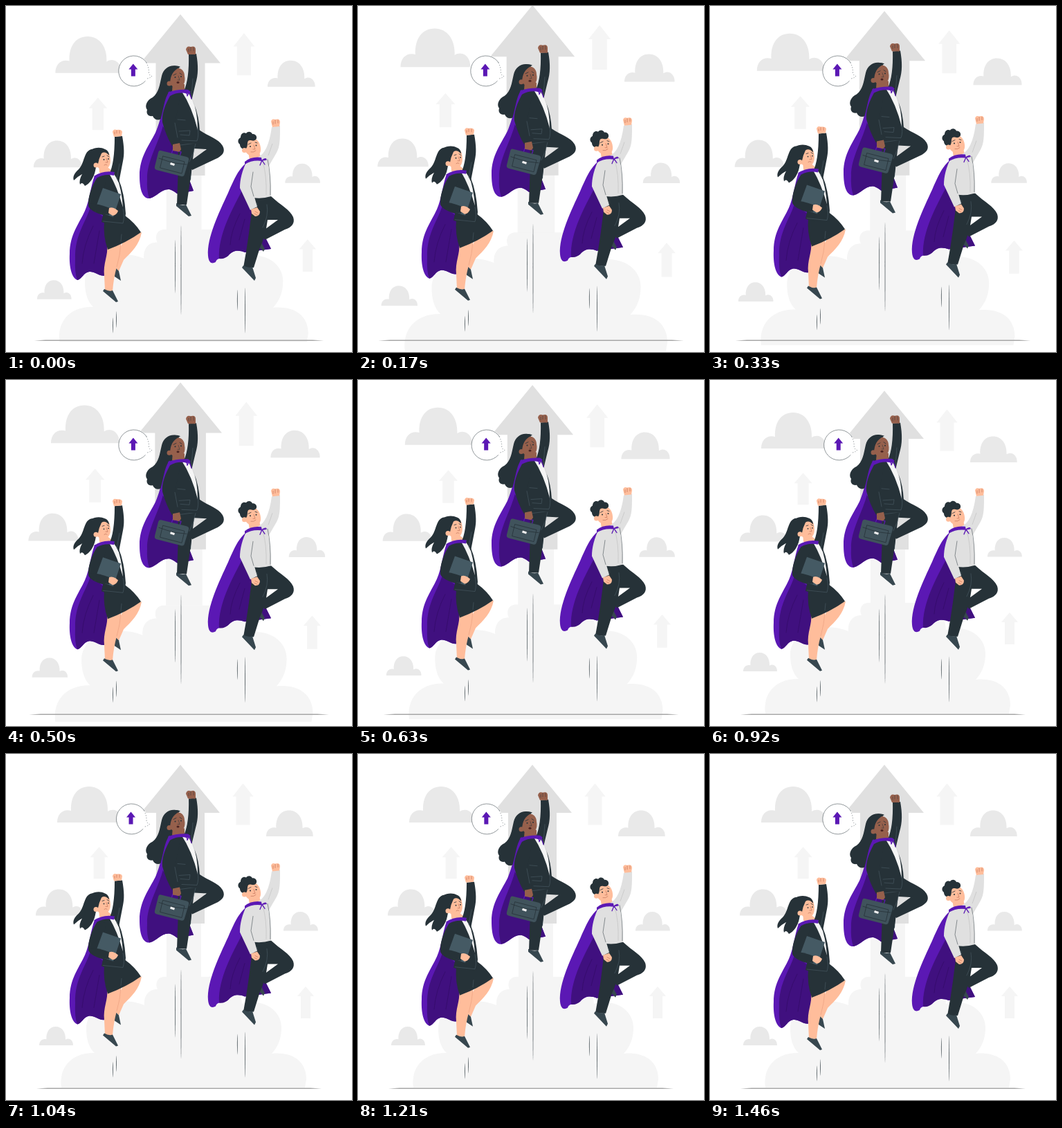
Write an HTML page that moves like this. It is 500 px wide and 500 px high and loops after 1.5 s.

```html
<!DOCTYPE html>
<html lang="en">
<head>
<meta charset="utf-8">
<title>Heroes taking off</title>
<style>
  html, body { margin: 0; width: 100%; height: 100%; overflow: hidden; background: #fff; }
  svg { display: block; width: 100vw; height: 100vh; }
  .dark { fill: #263238; }
  .grey { fill: #37474f; }
  .slate { fill: #455a64; }
  .cape { fill: #5b18b4; }
  .lining { fill: #40107f; }
  .shirt { fill: #e0e0e0; }
  .white { fill: #f5f5f5; }
  .skin { fill: #ffbd9b; }
  .brown { fill: #96604c; }
  .haze { fill: #f5f5f5; }
  .cloud { fill: #e9e9e9; }
  .seam, .ink, .thin, .bow, .knuckle, .fold { fill: none; stroke-linecap: round; stroke-linejoin: round; }
  .seam { stroke: #53656e; stroke-width: .5; }
  .ink { stroke: #263238; stroke-width: .8; }
  .thin { stroke: #263238; stroke-width: .5; }
  .bow { stroke: #5b18b4; stroke-width: 1.3; }
  .knuckle { stroke: #b5654d; stroke-width: .6; }
  .fold { stroke: #340c69; stroke-width: .8; }
</style>
</head>
<body>
<svg viewBox="0 0 500 500">
  <g id="sky">
    <path class="haze" d="M232 240H282V350H232Z"/>
    <path fill="#e0e0e0" d="M252 15.500L309 85H287V245H217V85H195Z"/>
    <g id="clouds" class="cloud"></g>
    <g id="arrows" class="haze"></g>
    <path class="haze" d="M80 482C76 452 96 431 128 432C119 424 116 410 116 397C116 372 140 357 168 357Q186 357 200 363C199 348 207 340 219 340C215 331 219 322 229 322H295C325 321 340 335 341 361Q352 357 362 359C385 362 398 378 398 395C398 410 394 422 384 433C415 430 434 445 434 470L432 482Z"/>
  </g>
  <path id="floor" fill="#a6a6a6" d="M44 483.4L60 482.4H440L456 483.4L440 483.9H60Z"/>

  <g id="bubble">
    <path fill="#fff" d="M206 86A22 22 0 1 0 203 106Q208 105 211 102Q207 101 206.500 97Z"/>
    <path class="thin" d="M203.400 82A22 22 0 1 0 201.400 108.500"/>
    <path class="thin" stroke-dasharray=".6 3" d="M203 82Q207 89 206.500 97Q208 101 211 101.500Q207 105 203 105"/>
    <path class="cape" d="M184 83.500L190.500 91.500H187V101.500H181V91.500H177.500Z"/>
  </g>

  <g id="heroes">
    <g id="streaks" class="dark"></g>

    <!-- left -->
    <g>
      <path class="cape" d="M128 245C122 262 121 280 114 296C106 314 92 330 92 358C91 377 95 393 103 396C110 395 112 384 122 384C132 385 136 392 145 389L160 330L152 250Z"/>
      <path class="lining" d="M122 290C117 310 99 330 100 365Q99 386 103 396C110 395 112 384 122 384C132 385 136 392 145 389L160 320Z"/>
      <path class="fold" d="M126 318Q112 345 110 372M135 325L127 372"/>
      <path class="dark" d="M124 207C112 209 114 227 105 236C99 241 96 247 98 252Q104 246 110 243Q105 252 107 258Q110 253 114 260C121 257 127 248 129 238L134 212Z"/>
      <path class="skin" d="M183 330L196 327C193 345 181 356 170 367L163 383L157 377C160 358 168 342 172 336Z"/>
      <path class="grey" d="M157 377L163 383L166 397L157 391Z"/>
      <path class="skin" d="M146 346C148 360 140 372 142 390L143 411L154 412C155 399 157 388 160 377C163 366 166 357 166 343Z"/>
      <path fill="none" stroke="#e89d7c" stroke-width=".6" d="M166 343Q165 360 160 377"/>
      <path class="grey" d="M142 409Q149 413 154 411L162 427L159 428L140 412Z"/>
      <path class="dark" d="M142 311L172 303Q186 313 195 327Q174 342 147 352Q140 332 142 311Z"/>
      <path class="seam" d="M167 330L166 340"/>
      <path class="skin" d="M134 229L135 241L151 246L154 239L147 233Z"/>
      <path class="dark" d="M157 189L168 188C171 205 171 215 169 224L163 255L149 243Q157 228 157 189Z"/>
      <path class="white" d="M145 242L154 241Q166 252 171 294L160 285Z"/>
      <path class="dark" d="M133 246L149 242Q161 262 169 291Q167 264 160 247L163 251Q171 270 173 300L171 316Q153 318 138 312L141 298Z"/>
      <path class="dark" d="M133 246C123 260 118 278 119 289Q122 297 140 302L149 303L151 292L137 284L145 250Z"/>
      <path class="seam" d="M140 311L169 314Q172 305 169 293M164 228L160 250M137 284L151 291"/>
      <path class="slate" d="M140 263L166 272L155 305L128 296Z"/>
      <path class="dark" d="M119 286Q128 284 150 292L149 302Q122 298 119 286Z"/>
      <path class="skin" d="M149 292Q153 290 158 293L162 296Q160 302 154 303L148 299Z"/>
      <path class="cape" d="M127 246Q140 237 157 240L156 245Q143 242 132 248Z"/>
      <path class="skin" d="M132 212C139 205 148 207 150 216C152 225 151 234 143 236C137 237 132 234 130 229Z"/>
      <path class="dark" d="M131 231C121 236 113 226 115 216C119 206 134 202 143 207C148 209 149 213 149 216Q143 209 138 213Q134 221 133 228Z"/>
      <circle class="skin" cx="130" cy="230" r="3.500"/>
      <path class="ink" d="M139 218L142 217M146 216L149 218"/>
      <path class="knuckle" d="M145 220L147 226L144 226M142 230Q145 228 146 230"/>
      <circle class="dark" cx="141.500" cy="222" r=".9"/><circle class="dark" cx="148" cy="221" r=".9"/>
      <path class="skin" d="M156 189L154 182Q155 177 160 179Q167 178 168 182L167 188Z"/>
      <path class="knuckle" d="M157 182V185M160 180V184M164 180V184"/>
    </g>

    <!-- middle -->
    <g>
      <path class="cape" d="M236 123C228 135 226 160 216 183C207 201 193 218 193 245C193 265 197 279 208 278C219 275 224 264 236 265C244 267 247 273 250 271L271 267L262 244L262 135Z"/>
      <path class="lining" d="M227 172C222 195 203 225 204 250Q203 266 207 278C219 275 224 264 236 265C244 267 247 273 250 271L271 267L262 244L255 180Z"/>
      <path class="dark" d="M250 88C239 83 228 89 225 101C222 114 221 125 212 132C203 136 200 145 204 150C202 156 206 160 212 159C215 166 223 166 227 161Q239 136 244 119Z"/>
      <path class="cape" d="M236 123C228 135 228 150 222 168L230 178L245 135Z"/>
      <path class="slate" d="M258 226L268 234L267 252L259 242Z"/>
      <path class="dark" d="M248 194L279 179C294 189 307 192 313 202C318 211 312 217 303 221L269 237L264 226L290 207L272 206Q269 228 268 240L261 287H247L249 230Z"/>
      <path class="seam" d="M274 199L271 211L265 225M252 201L274 198"/>
      <path class="grey" d="M246 285Q253 289 260 287L268 303L264 304L246 289Z"/>
      <path class="brown" d="M241 111L240 123L258 126L258 113Z"/>
      <path class="dark" d="M264 70L275 69C278 86 278 99 274 112L268 137L257 123Q265 105 264 70Z"/>
      <path class="white" d="M248 123L261 122Q274 138 279 180L268 165Z"/>
      <path class="dark" d="M239 125L253 122Q269 146 277 179Q277 152 269 134L272 142Q279 160 280 181L277 199L246 198Z"/>
      <path class="dark" d="M240 125C229 143 225 157 226 168Q231 187 240 202L252 198L244 169L251 135Z"/>
      <path class="seam" d="M244 169L248 190M248 164L259 165M250 181L266 180L265 187L252 186M254 194L276 195Q279 187 277 176M270 105L268 130"/>
      <path class="cape" d="M234 125Q247 120 263 121L267 124L262 127Q250 123 237 130Z"/>
      <path class="bow" d="M261 124L262 130L265 124L268 134"/>
      <path class="brown" d="M236 96C246 85 258 90 258 101C260 111 256 118 247 118C241 118 237 113 235 108Z"/>
      <path class="dark" d="M252 88C243 84 231 88 231 102L233 113L237 111C238 101 240 94 252 88Z"/>
      <circle class="brown" cx="236" cy="112" r="3.500"/>
      <path class="ink" d="M242 100L246 98M251 97L254 99"/>
      <path class="thin" d="M249 101L251 107L248 107"/>
      <ellipse cx="248.500" cy="110.500" rx="2" ry="1.500" fill="#4b2422"/>
      <circle class="dark" cx="244.500" cy="103" r="1"/><circle class="dark" cx="253" cy="102" r="1"/>
      <path class="brown" d="M263 70L260 63Q261 57 267 59Q274 57 274 63L274 70Z"/>
      <path class="thin" d="M264 62V66M267 60V65M271 60V65"/>
      <path class="bow" d="M239 214L241 208L253 211L251 217"/>
      <path class="brown" d="M241 200L251 198L253 207Q251 212 247 210L241 209Z"/>
      <path fill="#40535c" d="M224 209L261 218Q265 219 264 223L258 243Q257 247 253 246L218 237Q214 236 215 232L220 212Q221 208 224 209Z"/>
      <path class="ink" d="M221 220L233 224L244 227L261 229M227 217L258 225L254 242L223 234Z"/>
      <path fill="#f0f0f0" d="M238 226L244 228L243 231L237 229Z"/>
    </g>

    <!-- right -->
    <g>
      <path class="cape" d="M366 219C340 222 331 248 321 270C308 298 290 335 292 361C293 372 298 373 303 370C306 362 313 367 321 361C329 352 337 353 345 356L383 351L370 325L365 225Z"/>
      <path class="lining" d="M343 263C328 292 306 330 308 365C314 366 317 364 321 361C329 352 337 353 345 356L383 351L370 325Z"/>
      <path class="fold" d="M338 300Q325 325 324 345M345 308L337 338"/>
      <path class="grey" d="M366 336L374 351L372 355L364 346Z"/>
      <path class="dark" d="M357 276L383 275C397 288 410 294 415 305C418 314 413 320 403 323L374 338L367 328L393 309L378 309Q375 333 367 349L358 378H343Q352 330 357 276Z"/>
      <path class="seam" d="M377 287Q380 303 371 320M363 285L362 298"/>
      <path class="grey" d="M343 375Q350 379 356 377L361 393L359 397L341 378Z"/>
      <path class="skin" d="M350 210L352 223L369 222L366 211Z"/>
      <path class="shirt" d="M384 175L396 173C396 193 396 203 391 212L377 236L363 219Q379 213 384 175Z"/>
      <path class="shirt" d="M349 222Q362 217 375 221Q383 238 383 275Q370 279 357 277L354 258Z"/>
      <path class="shirt" d="M349 222C341 238 338 251 338 263L353 295L363 290L355 262L360 237Z"/>
      <path class="thin" d="M378 222Q383 243 382 273M357 240L354 261L358 275"/>
      <path fill="none" stroke="#bdbdbd" stroke-width=".6" d="M371 225Q377 245 376 273M385 199L379 216"/>
      <path class="cape" d="M345 225Q355 217 369 219L370 224Q356 222 345 229Z"/>
      <path class="bow" d="M370 223Q376 219 376 222L370 223L367 230M370 223L374 229"/>
      <path class="skin" d="M354 294L363 291L367 297Q367 304 360 304L355 300Z"/>
      <path class="knuckle" d="M360 297L364 299M359 300L363 302"/>
      <path class="skin" d="M346 195C355 186 367 192 368 205C369 213 365 217 357 217C350 217 346 211 344 206Z"/>
      <path class="dark" d="M345 207C341 207 338 204 338 200C334 197 335 192 339 190C339 185 343 182 347 184C350 180 355 182 356 185C361 184 364 190 361 193C357 197 353 192 350 195C348 198 350 202 347 206Z"/>
      <circle class="skin" cx="344.500" cy="208.500" r="3.500"/>
      <path class="ink" d="M350 200L354 198M360 197L363 198"/>
      <path class="knuckle" d="M358 201L360 207L357 207M354 211Q358 212 361 209"/>
      <circle class="dark" cx="353" cy="203" r="1"/><circle class="dark" cx="361.500" cy="201.500" r="1"/>
      <path class="skin" d="M385 175L383 167Q384 162 389 164Q396 162 396 168L395 174Z"/>
      <path class="knuckle" d="M386 167V171M389 165V170M393 165V169"/>
    </g>
  </g>
</svg>
<script>
const $ = id => document.getElementById(id);
const LOOP = 1500, PHASE = 22;

const addPath = (parent, d, transform = '') => {
  const p = document.createElementNS('http://www.w3.org/2000/svg', 'path');
  p.setAttribute('d', d);
  p.setAttribute('transform', transform);
  parent.appendChild(p);
};

// x, y, scale
const puff = 'M0 54C0 41 9 34 20 37C19 16 29 2 46 2S74 17 73 38C84 31 95 41 94 54Z';
[[74, 45, 1], [43, 194, .73], [376, 80, .72], [401, 227, .53], [48, 393, .52]]
  .forEach(([x, y, s]) => addPath($('clouds'), puff, `translate(${x} ${y}) scale(${s})`));

// tip x, tip y, half head, head height, half stem, total height
[[342.5, 42.5, 15, 19, 10, 60], [134.6, 134.3, 13, 15, 8, 46], [433, 336, 12, 14, 7, 46]]
  .forEach(([x, y, w, h, s, len]) =>
    addPath($('arrows'), `M${x} ${y}l${w} ${h}h${s - w}V${y + len}h${-2 * s}V${y + h}h${s - w}Z`));

// x, top, bottom
[[154.3, 450, 473], [159.6, 441, 465], [244.5, 338, 415], [253, 317, 446], [334.3, 410, 440], [345.4, 407, 473]]
  .forEach(([x, a, b]) => {
    const w = .45;
    addPath($('streaks'), `M${x} ${a}C${x + w} ${a + 4} ${x + w} ${b - 4} ${x} ${b}C${x - w} ${b - 4} ${x - w} ${a + 4} ${x} ${a}Z`);
  });

const swing = x => 1 - Math.abs(2 * x - 1);
const shake = [0, -1, 2, -4, 4, -4, 4, -4, 2, -1, 0];

function draw(now) {
  const u = ((now + PHASE) % LOOP) / LOOP;

  // three beats, then rest
  const s = 1 + (u < .6 ? .1 * swing((u * 5) % 1) : 0);
  $('sky').setAttribute('transform', `translate(250 250) scale(${s}) translate(-250 -250)`);
  $('floor').setAttribute('transform', `translate(250 0) scale(${s} 1) translate(-250 0)`);

  const i = Math.floor(u * 10), f = u * 10 - i;
  $('bubble').setAttribute('transform', `translate(${shake[i] + (shake[i + 1] - shake[i]) * f} 0)`);

  $('heroes').setAttribute('transform', `translate(0 ${.3 - 10 * swing(u)})`);
}

const start = performance.now();
function tick() {
  draw(performance.now() - start);
  requestAnimationFrame(tick);
}
tick();
</script>
</body>
</html>
```
